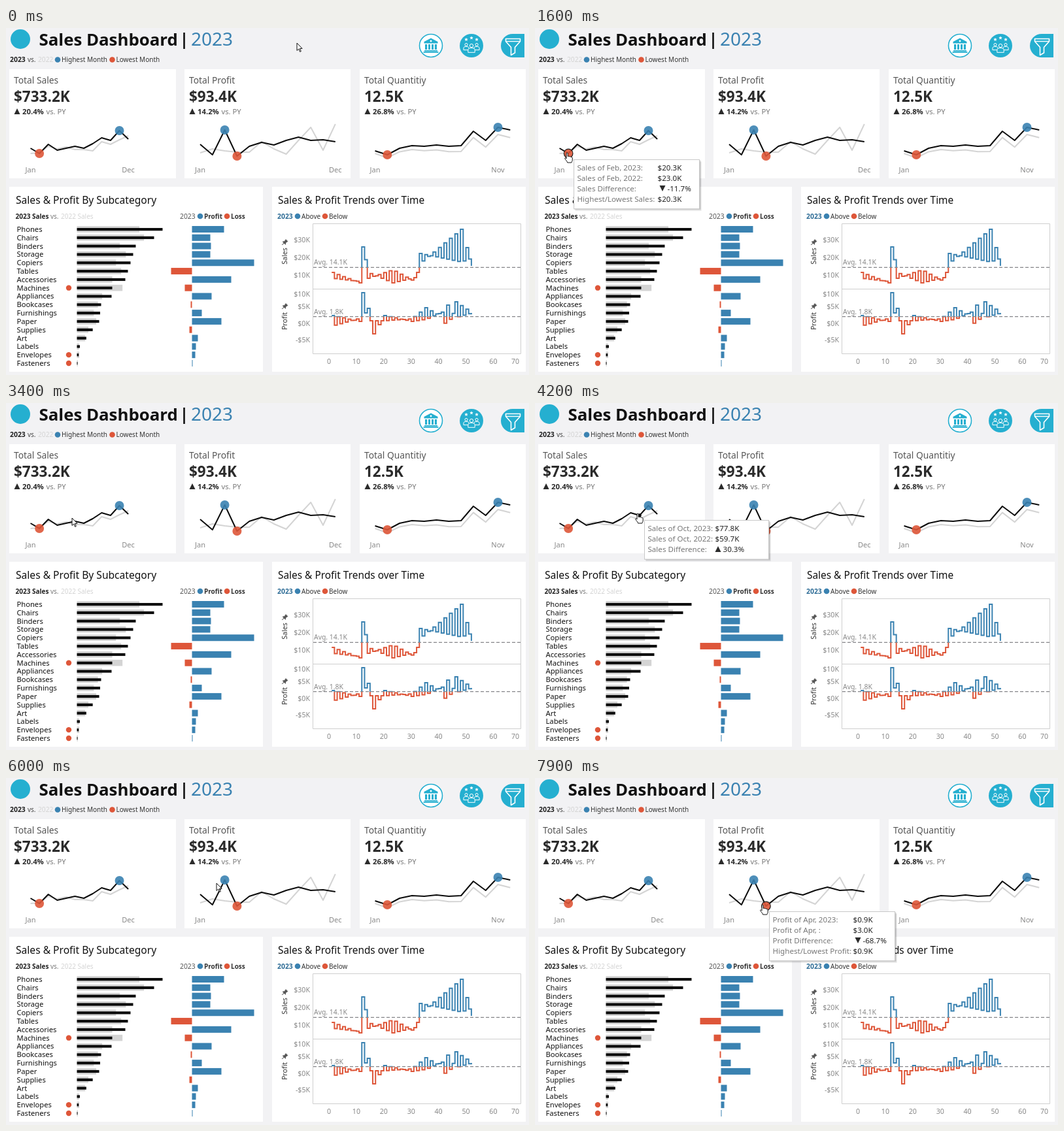
Recreate the animation shown at these times as an HTML page. Size 800 by 531 pixels, loop 8 s.

```html
<!DOCTYPE html>
<html lang="en">
<head>
<meta charset="utf-8">
<title>Sales Dashboard</title>
<style>
  html, body { margin: 0; width: 100%; height: 100%; overflow: hidden; background: #f2f2f4; }
  svg { display: block; width: 800px; height: 531px; font-family: "Noto Sans", "Open Sans", sans-serif; }
  text { white-space: pre; }
</style>
</head>
<body>
<svg id="stage" viewBox="0 0 800 531" xmlns="http://www.w3.org/2000/svg"></svg>
<script>
const BLUE = '#3a82b1', RED = '#de5639', TEAL = '#25afd0', PALE = '#d4d4d4', INK = '#2b2b2b', BLACK = '#0c0c0c';
const LOOP = 8000;

const text = (x, y, s, size, fill = '#111', weight = 400, anchor = 'start') =>
  `<text x="${x}" y="${y}" font-size="${size}" fill="${fill}" font-weight="${weight}" text-anchor="${anchor}">${s}</text>`;
const rect = (x, y, w, h, fill, extra = '') =>
  `<rect x="${x}" y="${y}" width="${w}" height="${h}" fill="${fill}" ${extra}/>`;
const dot = (x, y, r, fill, extra = '') => `<circle cx="${x}" cy="${y}" r="${r}" fill="${fill}" ${extra}/>`;
const path = (d, fill, stroke = 'none', width = 1, extra = '') =>
  `<path d="${d}" fill="${fill}" stroke="${stroke}" stroke-width="${width}" ${extra}/>`;
const triangle = (x, y, up) => path(up ? `M${x} ${y}h9l-4.5 -9z` : `M${x} ${y - 9}h9l-4.5 9z`, INK);
const legend = (x, y, color, label, weight = 500) => dot(x, y, 4.3, color) + text(x + 6, y + 3.5, label, 10, '#333', weight);

// Linear interpolation between key points [position, value, ...]; column picks the value
function along(keys, at, column = 1) {
  const i = Math.max(1, keys.findIndex(k => k[0] >= at));
  const a = keys[i - 1], b = keys[i];
  return a[column] + (b[column] - a[column]) * (at - a[0]) / (b[0] - a[0]);
}

function header() {
  const person = (x, y, s) => dot(x, y, 2.3 * s, 'none', 'stroke="#fff"') +
    path(`M${x - 4.5 * s} ${y + 9 * s}v${-3 * s}q0 ${-3 * s} ${4.5 * s} ${-3 * s}t${4.5 * s} ${3 * s}v${3 * s}z`, TEAL, '#fff');
  const star = (x, y) => path(`M${x} ${y - 2.6}l.8 1.7 1.9.2-1.4 1.3.4 1.9-1.7-1-1.7 1 .4-1.9-1.4-1.3 1.9-.2z`, '#fff');
  const bank = path('M650 15.5l10.5 5.5v2.5h-21v-2.5zM641 25h3.2v8h-3.2zM646 25h3v8h-3zM651 25h3v8h-3zM655.8 25h3.2v8h-3.2zM640 34h20v1.7h-20zM638.5 36.3h23v1.7h-23z', TEAL) +
    dot(650, 20, 1.4, '#fff');
  const funnel = path('M764.5 16.5h22v4l-8 9v8.5l-6 3.5v-12l-8-9z', 'none', '#fff', 1.6, 'stroke-linejoin="round"') +
    path('M765 20.5h21', 'none', '#fff', 1.4);
  return dot(22, 17, 15, TEAL) +
    text(50.5, 27, 'Sales Dashboard', 25.8, '#111', 600) +
    path('M272.5 7v25', 'none', '#111', 2.6) +
    text(283, 27, '2023', 28, BLUE) +
    text(6, 52, '2023', 10.4, '#222', 600) + text(33, 52, 'vs.', 10, '#444') + text(49, 52, '2022', 10.2, PALE) +
    legend(79, 48.5, BLUE, 'Highest Month') + legend(162.5, 48.5, RED, 'Lowest Month') +
    dot(650, 27, 17.5, '#fff', `stroke="${TEAL}" stroke-width="1.6"`) + bank +
    dot(712, 27, 18, TEAL) + star(704, 17.5) + star(712, 15) + star(720, 17.5) +
    person(704, 25.5, .9) + person(720, 25.5, .9) + person(712, 27, 1.15) +
    path('M793 9H775a18 18 0 0 0 0 36H793z', TEAL) + funnel;
}

// now and past hold one height per month; past may also be a rule applied to now
const kpis = [
  { left: 5, width: 255, title: 'Total Sales', value: '$733.2K', growth: '20.4%',
    x0: 37.5, step: 13.6, high: 10, low: 1, last: 11, lastLabel: 'Dec',
    now: [184, 192, 178, 187, 184, 181, 184, 177, 168, 172, 157, 170],
    past: [192, 191, 181, 185, 182, 186, 186, 188, 174, 178, 171, 165] },
  { left: 273, width: 254, title: 'Total Profit', value: '$93.4K', growth: '14.2%',
    x0: 297, step: 18.8, high: 2, low: 3, last: 11, lastLabel: 'Dec',
    now: [178, 194, 156, 196, 181, 175, 179, 172, 167, 172, 171, 174],
    past: [191, 185, 188, 190, 190, 174, 185, 193, 172, 152, 187, 147] },
  { left: 541, width: 254, title: 'Total Quantitiy', value: '12.5K', growth: '26.8%',
    x0: 564.5, step: 18.8, high: 10, low: 1, last: 10, lastLabel: 'Nov',
    now: [188, 194, 184, 180, 181, 179, 181, 180, 158, 172, 152, 156],
    past: (y, month) => y + 4 + month * .7 }
];

function kpi(k) {
  const x = month => k.x0 + month * k.step, tx = k.left + 7;
  const line = (ys, color) => path('M' + ys.map((y, i) => `${x(i)} ${y}`).join('L'), 'none', color, 2, 'stroke-linejoin="round"');
  const mark = (month, color) => dot(x(month), k.now[month], 7, color, 'opacity=".9"');
  const month = (i, label) => text(x(i), 220.5, label, 11, '#888', 400, 'middle');
  return rect(k.left, 63, k.width, 167, '#fff') +
    text(tx, 84.5, k.title, 13.8, '#555') + text(tx, 113, k.value, 22.5, INK, 700) +
    triangle(tx + .5, 132, true) +
    text(tx + 13, 131.5, k.growth, 11.3, INK, 600) + text(tx + 49.5, 131.5, 'vs. PY', 11.2, '#777') +
    line(typeof k.past === 'function' ? k.now.map(k.past) : k.past, PALE) + line(k.now, BLACK) +
    mark(k.high, BLUE) + mark(k.low, RED) + month(0, 'Jan') + month(k.last, k.lastLabel);
}

// Profit per category; a star flags sales below last year
const categories = ('Phones 49,Chairs 28,Binders 29,Storage 28,Copiers 95,Tables -32,Accessories 60,Machines* -11,' +
  'Appliances 30,Bookcases -2,Furnishings 15,Paper 45,Supplies -4,Art 9,Labels 6,Envelopes* 5,Fasteners* 1').split(',');
const salesByRank = [[0, 131], [1, 118], [2, 90], [6, 74], [7, 54], [8, 53], [9, 37], [11, 34], [14, 4.5], [16, 1]];

function subcategories() {
  const left = 108.5, zero = 284.5;
  const rows = categories.map((entry, i) => {
    const [name, profit] = entry.split(' '), flagged = name.endsWith('*');
    const y = 308 + i * 12.81, now = along(salesByRank, i);
    const past = now * (flagged ? 1.29 : .73 + .14 * (i % 2));
    return text(16.5, y + 4, name.replace('*', ''), 11.2, '#111', 500) +
      rect(left, y - 4.8, past, 9.6, PALE) + rect(left, y - 2, now, 4.2, BLACK) +
      rect(Math.min(zero, zero + +profit), y - 5, Math.abs(profit), 10, profit < 0 ? RED : BLUE) +
      (flagged ? dot(96, y, 4.2, RED) : '');
  }).join('');
  return rect(5, 243, 388, 283, '#fff') +
    text(15, 269, 'Sales &amp; Profit By Subcategory', 15.6, '#111', 500) +
    text(14.5, 291.5, '2023 Sales', 10, '#222', 600) + text(68, 291.5, 'vs.', 10, '#777') +
    text(84, 291.5, '2022 Sales', 10, PALE, 500) + text(266, 291.5, '2023', 10.3, '#555', 500) +
    legend(297, 288, BLUE, 'Profit', 600) + legend(338, 288, RED, 'Loss', 600) + rows;
}

// Weeks zigzag between two envelopes: [week, height on even weeks, height on odd weeks]
const salesEnvelope = [[1, 383, 374], [11, 388, 390], [12, 335, 335], [14, 383, 374], [23, 370, 390],
  [31, 388, 382], [33, 360, 345], [48, 308, 358], [52, 364, 352]];
const profitEnvelope = [[1, 456, 440], [11, 444, 449], [12, 405, 424], [14, 429, 448], [16, 468, 448], [20, 440, 448],
  [30, 449, 445], [35, 446, 428], [40, 437, 440], [43, 459, 424], [46, 419, 443], [52, 436, 436]];

const weekX = week => 494 + week * 4.19;

function pane(id, top, bottom, mean, label, envelope) {
  let d = `M${weekX(1)} ${along(envelope, 1, 2)}`;
  for (let week = 1; week <= 52; week++)
    d += `H${weekX(week)}V${along(envelope, week, 1 + week % 2)}`;
  const clip = (name, y0, y1) => `<clipPath id="${id + name}">${rect(470, y0, 317, y1 - y0, '#fff')}</clipPath>`;
  const line = (name, color) => path(d, 'none', color, 2, `clip-path="url(#${id + name})"`);
  return clip('above', top, mean) + clip('below', mean, bottom) +
    text(471, mean - 4, label, 10.4, '#888') + line('below', RED) + line('above', BLUE) +
    path(`M470 ${mean}H787`, 'none', '#858589', 1.2, 'stroke-dasharray="5 3"');
}

function trends() {
  const yTick = ([s, y]) => text(465, y + 4, s, 10.6, '#888', 400, 'end');
  const xTick = v => text(Math.min(weekX(v), 779), 514, v, 10.6, '#888', 400, 'middle');
  const axis = (s, y, pinY) =>
    `<g transform="translate(429.5 ${y}) rotate(-90)">${text(0, 0, s, 10.6, '#333', 400, 'middle')}</g>` +
    path(`M422 ${pinY + 5}l3-3-2-2 3-.5 2-3 3 3-3 2-.5 3-2-2z`, '#555', '#555', .6);
  return rect(407, 243, 388, 283, '#fff') +
    text(416, 269, 'Sales &amp; Profit Trends over Time', 15.4, '#111', 500) +
    text(415, 291.5, '2023', 10.4, '#2d6c96', 600) +
    legend(446, 288, BLUE, 'Above') + legend(488, 288, RED, 'Below') +
    path('M469.5 299.5H787.5V498.5H469.5ZM469.5 399.5H787.5', 'none', '#cfcfcf') +
    [['$30K', 324], ['$20K', 351], ['$10K', 377.5], ['$10K', 407], ['$5K', 426], ['$0K', 451.5], ['-$5K', 477]].map(yTick).join('') +
    [0, 10, 20, 30, 40, 50, 60, 70].map(xTick).join('') +
    axis('Sales', 349, 327) + axis('Profit', 448.5, 425) +
    pane('s', 300, 399, 366.3, 'Avg. 14.1K', salesEnvelope) +
    pane('p', 400, 498, 441.7, 'Avg. 1.8K', profitEnvelope);
}

// Places where the pointer rests; those with a month also show a tooltip
const stops = [
  { from: 0, to: 400, x: 445, y: 23 },
  { from: 1300, to: 2000, x: 49, y: 191, chart: 0, month: 1, name: 'Feb', now: '$20.3K', past: '$23.0K', change: '-11.7%' },
  { from: 2200, to: 3000, x: 61, y: 181, chart: 0, month: 2, name: 'Mar', now: '$58.9K', past: '$51.7K', change: '13.8%' },
  { from: 3900, to: 4700, x: 157, y: 169, chart: 0, month: 9, name: 'Oct', now: '$77.8K', past: '$59.7K', change: '30.3%' },
  { from: 5600, to: 6100, x: 322, y: 161 },
  { from: 6500, to: 7400, x: 335, y: 162, chart: 1, month: 2, name: 'Mar', now: '$14.8K', past: '$3.6K', change: '308.4%' },
  { from: 7600, to: 8100, x: 348, y: 194, chart: 1, month: 3, name: 'Apr', now: '$0.9K', past: '$3.0K', change: '-68.7%' }
];

function hover(s) {
  const k = kpis[s.chart], markX = k.x0 + s.month * k.step, markY = k.now[s.month];
  const extreme = s.month === k.high || s.month === k.low, rising = s.change[0] !== '-';
  const measure = ['Sales', 'Profit'][s.chart], pastYear = ['2022', ''][s.chart];
  const rows = [[`${measure} of ${s.name}, 2023:`, s.now], [`${measure} of ${s.name}, ${pastYear}:`, s.past], [`${measure} Difference:`]];
  if (extreme) rows.push([`Highest/Lowest ${measure}:`, s.now]);

  const width = extreme ? 192 : 190, height = rows.length * 15.7 + 12.5, col = extreme ? 128 : 108;
  const value = (x, y, label) => text(x, y, label, 11.6, '#222', 500);
  const body = rows.map(([label, amount], i) => {
    const y = 16.5 + i * 16, x = col + (rising ? 0 : 3);
    return text(5, y, label, 11.6, '#777', 300) +
      (amount ? value(col, y, amount) : triangle(x, y, rising) + value(x + 12, y, s.change));
  }).join('');
  return (extreme ? dot(markX, markY, 6.8, 'none', 'stroke="#222" stroke-width="1.2"') : dot(markX, markY, 2.8, BLACK)) +
    `<g transform="translate(${s.x + 10.5} ${s.y + 10.5})">` +
    rect(2, 3, width + 1, height, 'rgba(0,0,0,.10)') + rect(1, 1, width + 1, height, 'rgba(0,0,0,.14)') +
    rect(0, 0, width, height, '#fff', 'stroke="#c8c8c8"') + body + '</g>';
}

const ARROW = 'M0 0V11.5L2.7 9 4.6 13.4 6.3 12.7 4.4 8.4H8.1Z';
const HAND = 'M-1 1C-1-.3 1.2-.3 1.2 1V5.5C2.5 4.8 3.4 5.2 3.7 6 4.8 5.4 5.8 5.8 6.1 6.6 7.4 6.2 8.2 7 8.2 8V11C8.2 13 7 13.5 6.8 15H.6C.4 13-2.6 10.6-3.4 8.6-3.4 7.4-2 7.5-1 9Z';

function pointer(t) {
  const i = stops.findIndex(s => t < s.to), b = stops[i];
  if (t >= b.from) return [b.x, b.y];
  const a = stops[i - 1], u = (t - a.to) / (b.from - a.to), e = u * u * (3 - 2 * u);
  return [a.x + (b.x - a.x) * e, a.y + (b.y - a.y) * e].map(Math.round);
}

const stage = document.getElementById('stage');
stage.innerHTML = rect(0, 0, 800, 531, '#f2f2f4') + header() + kpis.map(kpi).join('') +
  subcategories() + trends() + '<g id="live"></g>';
const live = document.getElementById('live');

let shown = -1;
function draw(time) {
  const t = Math.floor(time % LOOP / 100) * 100;
  if (t !== shown) {
    shown = t;
    const [x, y] = pointer(t);
    const active = stops.find(s => s.name && t >= s.from && t < s.to);
    live.innerHTML = (active ? hover(active) : '') +
      path(active ? HAND : ARROW, '#fff', '#111', 1, `transform="translate(${x} ${y})"`);
  }
  requestAnimationFrame(draw);
}
draw(0);
</script>
</body>
</html>
```
